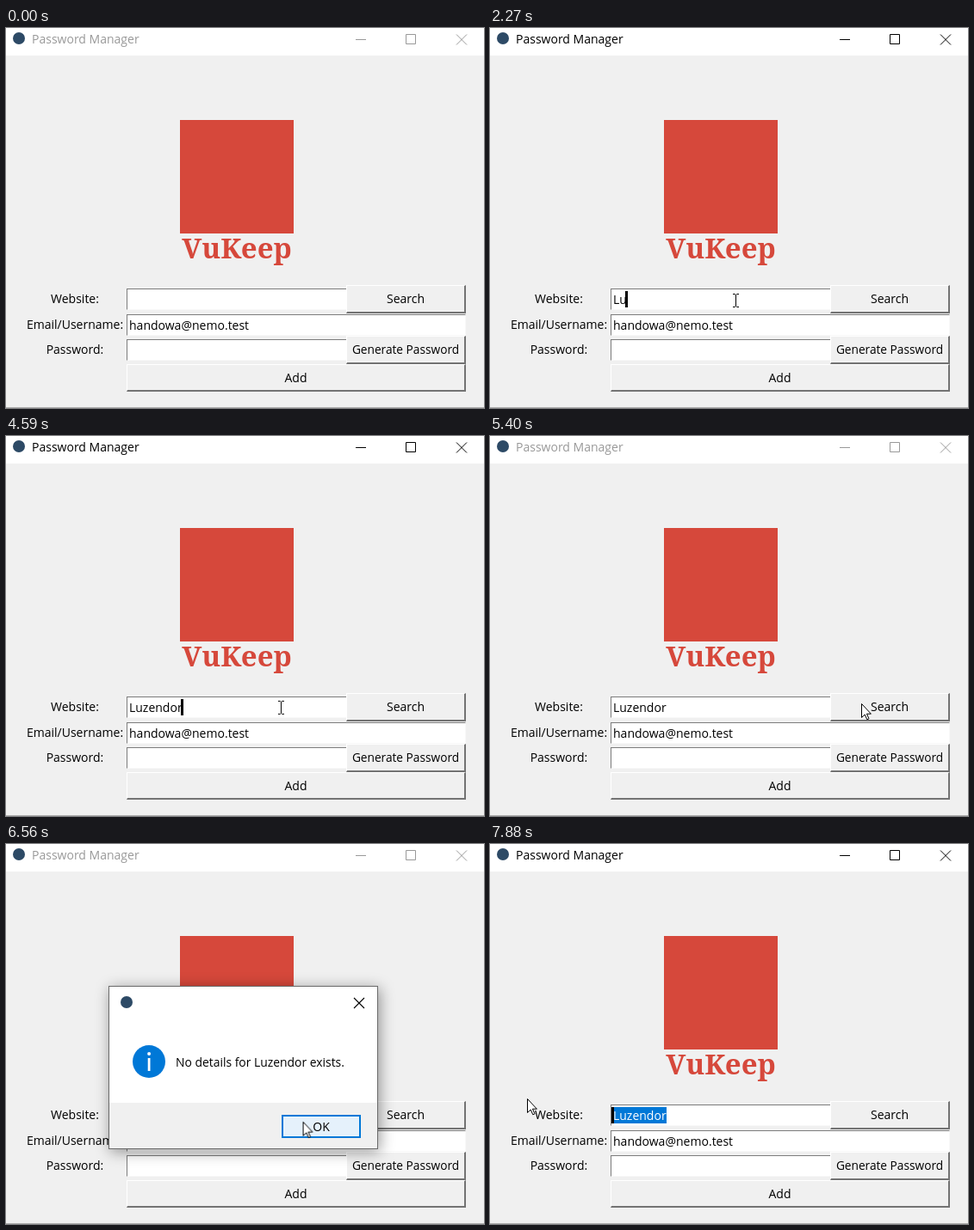
Animation, 555 px wide and 442 px high, one loop 8 s. Source, as an HTML page:

```html
<!DOCTYPE html>
<html lang="en">
<head>
<meta charset="utf-8">
<title>Password Manager</title>
<style>
  html, body { margin: 0; width: 100%; height: 100%; overflow: hidden; background: #f0f0f0; }
  #stage {
    position: relative; width: 555px; height: 442px; overflow: hidden;
    background: #f0f0f0; color: #000; font: 14px/20px "Open Sans", "Noto Sans", sans-serif;
  }
  #stage div, #stage svg { position: absolute; box-sizing: border-box; white-space: nowrap; }
  svg { left: 0; top: 0; overflow: visible; }

  /* Every animation shares one 8 s loop */
  .chrome, .search, .dialog, .ok, .pointer, .halo, .arrow, .beam {
    animation: 8s step-end infinite;
  }

  .titlebar { left: 0; top: 0; width: 555px; height: 32px; background: #fff; }
  .chrome { inset: 0; animation-name: focus; }
  .chrome span { position: absolute; left: 30px; top: 3px; }
  .badge { width: 14px; height: 14px; border-radius: 50%; background: #2d4a66; }
  .edge { left: 0; top: 441px; width: 555px; height: 1px; background: #acacac; }

  .mark { left: 202px; top: 107px; width: 132px; height: 132px; background: #d6483b; }
  .name {
    left: 168px; top: 236px; width: 200px; text-align: center; color: #d6483b;
    font: 800 33px/40px "Noto Serif", "DejaVu Serif", serif;
  }

  .label { left: 0; width: 160px; text-align: center; }
  .entry {
    left: 140px; width: 256px; height: 25px; padding-left: 2px; line-height: 23px;
    background: #fff; border: 1px solid; border-color: #7c7c7c #f8f8f8 #f8f8f8 #7c7c7c;
  }
  .button {
    left: 395px; width: 139px; height: 33px; line-height: 30px; text-align: center;
    background: #f0f0f0; border: solid; border-width: 1px 2px 2px 1px;
    border-color: #fff #737373 #737373 #fff;
  }
  .search { animation-name: press; }
  #tail { background: #0078d7; color: #fff; }
  #caret { position: relative; }
  #caret::before {
    content: ""; position: absolute; left: -2px; top: 0; width: 3px; height: 19px; background: #000;
  }

  .dialog {
    left: 119px; top: 165px; width: 313px; height: 190px; opacity: 0;
    background: #fff; border: 1px solid #6a6a6a; box-shadow: 2px 3px 16px rgba(0, 0, 0, .4);
    animation-name: popup; animation-timing-function: linear;
  }
  .footer { left: 0; top: 135px; width: 311px; height: 53px; background: #f0f0f0; }
  .message { left: 77px; top: 78px; font-size: 13.9px; }
  .ok {
    left: 200px; top: 149px; width: 92px; height: 27px; line-height: 23px; text-align: center;
    background: #e1e1e1; border: 2px solid #0078d7; animation-name: confirm;
  }

  .pointer { left: 0; top: 0; width: 0; height: 0; animation-name: travel; animation-timing-function: ease-in-out; }
  .halo {
    left: -15px; top: -15px; width: 30px; height: 30px; border-radius: 50%;
    background: rgba(255, 255, 0, .6); opacity: 0; animation-name: click;
  }
  .arrow { animation-name: arrow; }
  .beam { animation-name: beam; }

  @keyframes focus {
    0%, 67.4% { color: #999; }
    11.6%, 86.9%, 100% { color: #000; }
  }
  @keyframes press {
    64.2% { border-color: #737373 #fff #fff #737373; text-indent: 2px; line-height: 32px; }
    67.3% { border-color: #fff #737373 #737373 #fff; text-indent: 0; line-height: 30px; }
  }
  @keyframes popup {
    0%, 67.6% { opacity: 0; transform: scale(.92); }
    70%, 86.4% { opacity: 1; transform: none; }
    88.6%, 100% { opacity: 0; transform: scale(.952); }
  }
  @keyframes confirm {
    0% { background: #e1e1e1; border-color: #0078d7; }
    78.5% { background: #e5f1fb; }
    83.7% { background: #cce4f7; border-color: #005499; }
    86.2%, 100% { background: #e5f1fb; border-color: #0078d7; }
  }
  @keyframes travel {
    0% { transform: translate(401px, 409px); visibility: hidden; animation-timing-function: step-end; }
    .8% { transform: translate(401px, 409px); visibility: visible; animation-timing-function: ease-out; }
    8.375%, 55.3% { transform: translate(283px, 316px); }
    61.6%, 72.6% { transform: translate(431px, 311px); }
    83%, 87.9% { transform: translate(343px, 323px); }
    91.8%, 94% { transform: translate(261px, 322px); }
    98.3%, 100% { transform: translate(43px, 296px); visibility: visible; }
  }
  @keyframes click {
    0%, 14.2%, 67.3%, 86.2%, 94.3%, 100% { opacity: 0; }
    11.6%, 64.2%, 83.7%, 91.8% { opacity: 1; }
  }
  @keyframes arrow {
    0%, 59.3%, 97%, 100% { opacity: 1; }
    2.2%, 86.9% { opacity: 0; }
  }
  @keyframes beam {
    0%, 59.3%, 97%, 100% { opacity: 0; }
    2.2%, 86.9% { opacity: 1; }
  }
</style>
</head>
<body>
<div id="stage">
  <div class="titlebar">
    <div class="badge" style="left:8px;top:5px"></div>
    <div class="chrome">
      <span>Password Manager</span>
      <svg width="555" height="32" fill="none" stroke="currentColor">
        <path d="M406 13.5h12M464.5 7.5h11v11h-11zM523 7.5l12 12M535 7.5l-12 12"/>
      </svg>
    </div>
  </div>

  <div class="mark"></div>
  <div class="name">VuKeep</div>

  <div class="label" style="top:305px">Website:</div>
  <div class="label" style="top:335px">Email/Username:</div>
  <div class="label" style="top:364px">Password:</div>

  <div class="entry" style="top:303px"><span id="head"></span><span id="caret"></span><span id="tail"></span></div>
  <div class="entry" style="top:333px;width:394px">handowa@nemo.test</div>
  <div class="entry" style="top:362px"></div>
  <div class="button search" style="top:299px">Search</div>
  <div class="button" style="top:358px;font-size:13.7px">Generate Password</div>
  <div class="button" style="top:391px;left:140px;width:394px;height:32px">Add</div>
  <div class="edge"></div>

  <div class="dialog">
    <div class="badge" style="left:13px;top:11px"></div>
    <svg width="311" height="135">
      <path d="M284 13l12 12M296 13l-12 12" stroke="#000" stroke-width="1.1"/>
      <circle cx="46" cy="87" r="19" fill="#0078d7"/>
      <path d="M44.7 83h2.8v15h-2.8z" fill="#fff"/>
      <circle cx="46.1" cy="78" r="2" fill="#fff"/>
    </svg>
    <div class="message">No details for Luzendor exists.</div>
    <div class="footer"></div>
    <div class="ok">OK</div>
  </div>

  <div class="pointer">
    <div class="halo"></div>
    <svg class="arrow" width="12" height="19">
      <path d="M.5 .5V16.5l3.7-3.5 2.6 5.8 2.2-1-2.6-5.6h5z" fill="#fff" stroke="#000"/>
    </svg>
    <svg class="beam" width="7" height="16">
      <path d="M-1-6.5h2.5l1 1 1-1H6M2.5-6V8M-1 8.5h2.5l1-1 1 1H6" fill="none" stroke="#000"/>
    </svg>
  </div>
</div>
<script>
  const LOOP = 8000;
  const WORD = "Luzendor";
  const KEY_TIMES = [1470, 2250, 2450, 2590, 3050, 3510, 3640, 3840];
  const SELECT = { from: 7620, to: 7690 };
  const [head, caret, tail] = ["head", "caret", "tail"].map(id => document.getElementById(id));
  const clock = document.querySelector(".pointer").getAnimations()[0];

  const blinkOn = age => age >= 0 && age % 900 < 600;
  const caretOn = t => t < 5380 ? blinkOn(t - 910) : blinkOn(t - 6940);

  function render() {
    const t = (clock.currentTime || 0) % LOOP;
    const typed = KEY_TIMES.filter(key => t >= key).length;
    const drag = Math.min(1, Math.max(0, (t - SELECT.from) / (SELECT.to - SELECT.from)));
    const split = typed - Math.round(drag * WORD.length);
    head.textContent = WORD.slice(0, split);
    tail.textContent = WORD.slice(split, typed);
    caret.style.visibility = caretOn(t) ? "visible" : "hidden";
    requestAnimationFrame(render);
  }
  render();
</script>
</body>
</html>
```
